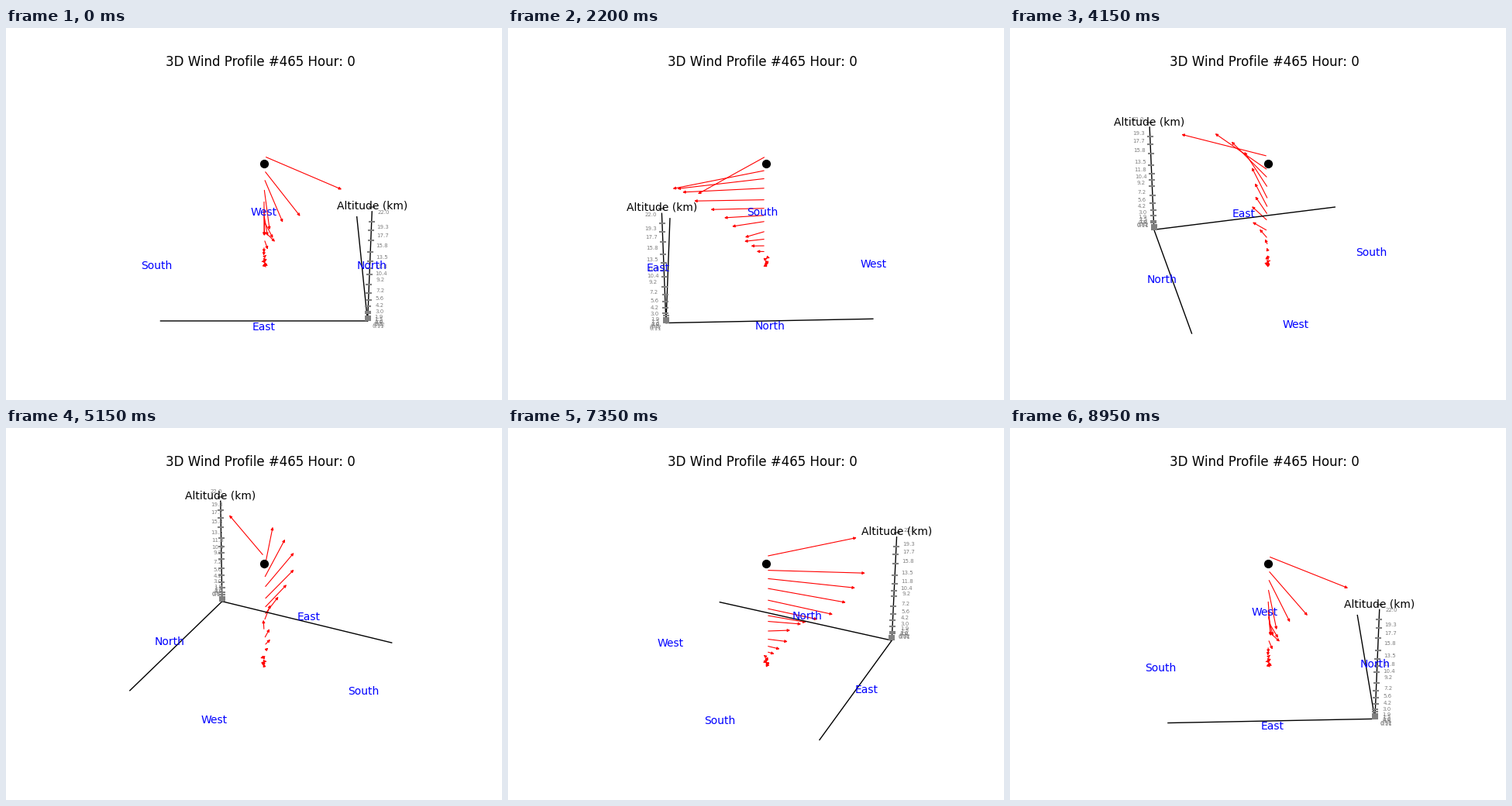
These frames come from a looping animation (640x480 px, 9 s). A matplotlib script:

```python
import numpy as np
import matplotlib.pyplot as plt
from matplotlib.animation import FuncAnimation
from matplotlib.patches import FancyArrowPatch

W, H, DPI = 640, 480, 100
FRAMES, STEP_MS = 180, 50
CX, CY, FOCAL, DIST = 333.0, 242.6, 1997.8, 10.0
ELEV = np.radians(30)
HALF = 0.645                      # half width of the ground square
RIM = 1.1 * HALF                  # labels sit just outside it
Z_SCALE, Z_MID = 0.0372, 11.06    # altitude in km to view units
AXIS_TOP = 21.15

ALTS = [0.11, 0.32, 0.5, 0.8, 1.0, 1.5, 1.9, 3.0, 4.2, 5.6, 7.2, 9.2,
        10.4, 11.8, 13.5, 15.8, 17.7, 19.3, 22.0]

# key points of the eastward wind: altitude, strength
EAST_Z = [0, 1.3, 1.9, 3, 5.6, 7.2, 10.4, 13.5, 15.8, 19.3, 22]
EAST_U = [.02, 0, -.025, .076, .156, .152, .285, .476, .548, .602, .441]


def wind(alt):
    """East and north wind: ground gusts, a mid-level bump, a turn aloft."""
    east = np.interp(alt, EAST_Z, EAST_U)
    gust = 0.03 * np.exp(-alt / 3) * np.sin(4 * alt)
    bump = 0.09 * np.exp(-((alt - 7.9) / 2.2) ** 2)
    turn = 0.0067 * max(alt - 13.5, 0) ** 2
    return east, gust + bump + turn


def project(x, y, alt, azim):
    """Perspective view of a point, in pixels from the lower left."""
    z = (np.asarray(alt) - Z_MID) * Z_SCALE
    side = -x * np.sin(azim) + y * np.cos(azim)
    near = x * np.cos(azim) + y * np.sin(azim)
    depth = DIST - near * np.cos(ELEV) - z * np.sin(ELEV)
    rise = z * np.cos(ELEV) - near * np.sin(ELEV)
    return CX + FOCAL * side / depth, CY + FOCAL * rise / depth


fig = plt.figure(figsize=(W / DPI, H / DPI), dpi=DPI, facecolor="white")
ax = fig.add_axes([0, 0, 1, 1])
ax.set_xlim(0, W)
ax.set_ylim(0, H)
ax.axis("off")
ax.text(328, 430.73, "3D Wind Profile #465 Hour: 0", fontsize=12, ha="center")

# three edges that meet in the north-east corner
path_x = HALF * np.array([1, 1, -1])
path_y = HALF * np.array([-1, 1, 1])
ground, = ax.plot([], [], color="black", lw=1)
mast, = ax.plot([], [], color="black", lw=1)
ticks, = ax.plot([], [], "_", color="gray", ms=6, mew=1.5, zorder=2.5)
ax.plot(*project(0, 0, 20.6, 0), "o", color="black", ms=7.07, zorder=2.2)

labels = []


def add_label(text, x, y, alt, size, color):
    art = ax.text(0, 0, text, fontsize=size, color=color,
                  ha="center", va="center")
    labels.append((art, x, y, alt))


for alt in ALTS:
    add_label(str(alt), RIM, RIM, alt, 5, "gray")
for k, name in enumerate(["East", "North", "West", "South"]):
    turn = k * np.pi / 2
    add_label(name, RIM * np.cos(turn), RIM * np.sin(turn), 0, 10, "blue")
add_label("Altitude (km)", HALF, HALF, 1.05 * AXIS_TOP, 10, "black")

arrows = []
for alt in ALTS:
    arrow = FancyArrowPatch((0, 0), (1, 1), arrowstyle="-|>",
                            mutation_scale=5, lw=0.8, color="red")
    arrows.append((ax.add_patch(arrow), alt, *wind(alt)))


def draw(i):
    azim = 2 * np.pi * i / FRAMES
    ground.set_data(*project(path_x, path_y, 0, azim))
    mast.set_data(*project(HALF, HALF, [0, AXIS_TOP], azim))
    ticks.set_data(*project(HALF, HALF, ALTS, azim))
    for art, x, y, alt in labels:
        art.set_position(project(x, y, alt, azim))
    for arrow, alt, east, north in arrows:
        arrow.set_positions(project(0, 0, alt, azim),
                            project(east, north, alt, azim))
    return []


anim = FuncAnimation(fig, draw, frames=FRAMES, interval=STEP_MS,
                     repeat=True, repeat_delay=0, blit=False)
plt.show()
```
